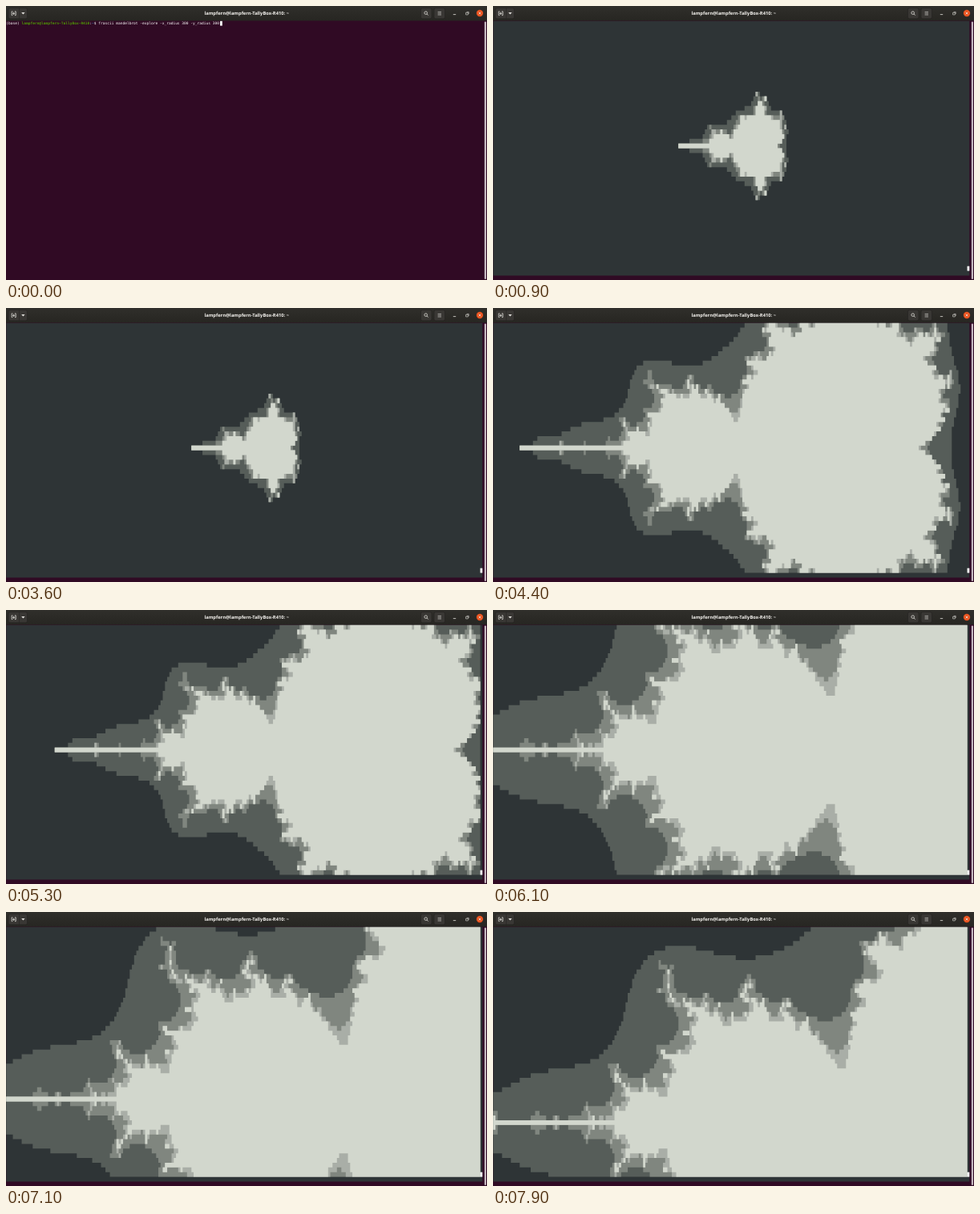
An HTML page for the animation above (8 s loop, 600 px wide and 342 px high).

```html
<!DOCTYPE html>
<html lang="en">
<head>
<meta charset="utf-8">
<title>Terminal fractal explorer</title>
<style>
  html, body { margin: 0; width: 100%; height: 100%; overflow: hidden; background: #300a24; }
  svg { display: block; width: 600px; height: 342px; }
  text { text-rendering: geometricPrecision; white-space: pre; }
  .title { font: bold 5.75px "Open Sans", "Noto Sans", sans-serif; fill: #f4f2ee; text-anchor: middle; }
  .mono { font: 4.568px "DejaVu Sans Mono", monospace; fill: #fff; }
  .user { fill: #4e9a06; font-weight: bold; }
  .dir { fill: #3465a4; font-weight: bold; }
  .icon { fill: none; stroke: #e4e2de; stroke-width: .8; }
  .button { fill: #393734; stroke: #242321; stroke-width: .6; }
</style>
</head>
<body>
<svg viewBox="0 0 600 342">
  <defs>
    <linearGradient id="bar" x2="0" y2="1">
      <stop offset="0" stop-color="#302f2b"/>
      <stop offset="1" stop-color="#272622"/>
    </linearGradient>
  </defs>
  <rect width="600" height="342" fill="#300a24"/>

  <g id="shell">
    <text class="mono" x=".3" y="23.3">(base) <tspan class="user">lampfern@lampfern-TallyBox-R410</tspan>:<tspan class="dir">~</tspan>$ frascii mandelbrot -explore -x_radius 300 -y_radius 300</text>
  </g>
  <g id="fractal">
    <rect x=".3" y="18.7" width="594" height="317.8" fill="#2e3436"/>
  </g>
  <rect id="cursor" width="2.75" height="5.885" fill="#fff"/>
  <rect x="596.8" y="19.5" width="2.2" height="321.5" rx="1" fill="#c6b8c1"/>

  <rect width="600" height="18.4" fill="url(#bar)"/>
  <text class="title" x="300.2" y="11">lampfern@lampfern-TallyBox-R410: ~</text>
  <rect class="button" x="3" y="2.5" width="23.5" height="13.3" rx="2"/>
  <path d="M16.5 2.8V15.5" stroke="#242321" stroke-width=".6"/>
  <path class="icon" d="M8.3 6.8H7.2V11.6H8.3M11 6.8H12.2V11.6H11M9.7 7.6V11M8 9.3H11.4"/>
  <path d="M19.2 8L23.6 8L21.4 10.6Z" fill="#e4e2de"/>
  <rect class="button" x="517.5" y="2.5" width="13.5" height="13.3" rx="2"/>
  <g class="icon">
    <circle cx="523.7" cy="8.6" r="1.8"/>
    <path d="M525 9.9L526.7 11.6"/>
  </g>
  <rect class="button" x="534" y="2.5" width="13.5" height="13.3" rx="2"/>
  <path class="icon" d="M538.6 7.4H543M538.6 9.2H543M538.6 11H543" style="stroke-width:.6"/>
  <path class="icon" d="M557.8 10.6H561.2"/>
  <path class="icon" d="M573.6 8.3H576.3V10.9H573.6ZM574.6 7.4H577.2V10" style="stroke-width:.6"/>
  <circle cx="591" cy="9" r="4.2" fill="#e95420"/>
  <path class="icon" d="M589.6 7.6L592.4 10.4M592.4 7.6L589.6 10.4"/>
</svg>
<script>
const LOOP = 8000;
const COLS = 215, ROWS = 53;
const CELL_W = 2.75, CELL_H = 5.885, LEFT = .3, TOP = 18.7;
const SHADES = ["#565d59", "#80867f", "#a9aea7", "#d2d7cd"];
const MAX_ITER = 20, BAND = 5;

// start time, zoom, shift in columns, shift in rows
const VIEWS = [
  [900, 1, 0, 0], [3900, 2, 0, 0], [4400, 4, 0, 0],
  [5000, 4, 5, 0], [5300, 4, 10, 0], [5500, 4, 15, 0], [5700, 4, 20, 0],
  [6100, 8, 40, 0], [6500, 8, 40, 5], [6900, 8, 40, 10], [7300, 8, 40, 15],
  [7900, 8, 45, 15]
];
const CURSOR_OFF = [[300, 900], [1500, 2100], [2700, 3000]];

const byId = id => document.getElementById(id);
const shell = byId("shell"), fractal = byId("fractal"), cursor = byId("cursor");
const layers = SHADES.map(fill => {
  const path = document.createElementNS("http://www.w3.org/2000/svg", "path");
  path.setAttribute("fill", fill);
  return fractal.appendChild(path);
});

const cellX = col => LEFT + col * CELL_W;
const cellY = row => TOP + row * CELL_H;

function escapeTime(a, b) {
  let x = a, y = b, n = 0;
  while (n < MAX_ITER && x * x + y * y < 4) {
    [x, y] = [x * x - y * y + a, 2 * x * y + b];
    n++;
  }
  return n;
}

function shadeGrid(zoom, dx, dy) {
  return Array.from({ length: ROWS }, (_, row) =>
    Array.from({ length: COLS }, (_, col) => {
      const a = (col - 107 - dx) / (20 * zoom) - .8;
      const b = (26 + dy - row) / (10 * zoom);
      return Math.floor(escapeTime(a, b) / BAND);
    }));
}

// Each layer covers every cell of its shade or brighter, as horizontal runs.
function layerPath(grid, level) {
  let d = "";
  grid.forEach((line, row) => {
    for (let col = 0; col < COLS; col++) {
      if (line[col] < level) continue;
      const start = col;
      while (col < COLS && line[col] >= level) col++;
      d += `M${cellX(start)} ${cellY(row).toFixed(3)}H${cellX(col)}V${cellY(row + 1).toFixed(3)}H${cellX(start)}Z`;
    }
  });
  return d;
}

const cache = new Map();
function viewPaths(view) {
  if (!cache.has(view)) {
    const grid = shadeGrid(...view.slice(1));
    cache.set(view, layers.map((_, i) => layerPath(grid, i + 1)));
  }
  return cache.get(view);
}

let shown = null;
function draw(t) {
  const view = VIEWS.filter(v => v[0] <= t).pop();
  shell.style.display = view ? "none" : "";
  fractal.style.display = view ? "" : "none";
  if (view && view !== shown) {
    viewPaths(view).forEach((d, i) => layers[i].setAttribute("d", d));
    shown = view;
  }
  cursor.setAttribute("x", cellX(view ? COLS : 97));
  cursor.setAttribute("y", cellY(view ? ROWS - 1 : 0));
  const off = CURSOR_OFF.some(([from, to]) => t >= from && t < to);
  cursor.style.display = off ? "none" : "";
}

VIEWS.forEach(viewPaths);
const begin = performance.now();
function tick() {
  draw((performance.now() - begin) % LOOP);
  requestAnimationFrame(tick);
}
tick();
</script>
</body>
</html>
```
